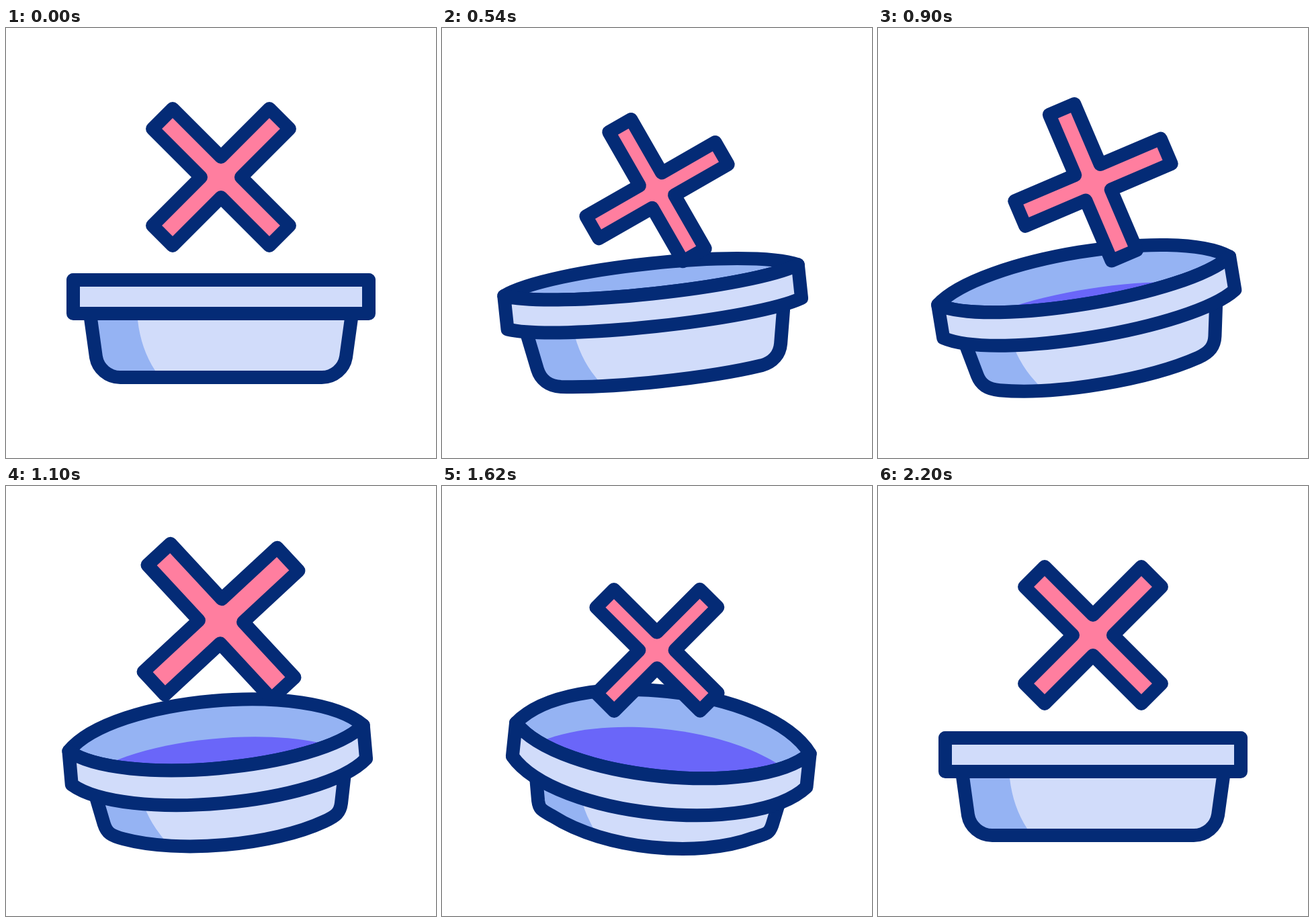
An HTML page with a canvas that plays this animation: 640x640 px, repeating every 2.4 s.

```html
<!DOCTYPE html>
<html lang="en">
<head>
<meta charset="utf-8">
<title>Basin</title>
<style>
html, body { margin: 0; width: 100%; height: 100%; overflow: hidden; background: #fff; }
canvas { display: block; width: 640px; height: 640px; }
</style>
</head>
<body>
<canvas id="stage" width="640" height="640"></canvas>
<script>
const ctx = document.getElementById('stage').getContext('2d');
const LOOP = 2400;
const NAVY = '#042b76', PINK = '#ff7e9f', PALE = '#d1dcfa', BLUE = '#95b3f3', WATER = '#6a66f9';
const RAD = Math.PI / 180;

// Keys are [ms, value] pairs joined by sine ease-in-out.
const TILT = [[200, 0], [800, -10], [1600, 6], [2200, 0]];
const OPEN = [[200, 0], [800, 41], [1400, 70], [1600, 70], [2200, 0]];
const DROP = [[200, 0], [700, 1], [1200, -1], [1700, 1], [2200, 0]];
const TURN = [[200, 0], [800, 25], [1400, -20.5], [1800, 14.5], [2200, 0]];

function at(keys, t) {
  if (t <= keys[0][0]) return keys[0][1];
  for (let i = 1; i < keys.length; i++) {
    const [a, va] = keys[i - 1], [b, vb] = keys[i];
    if (t < b) return va + (vb - va) * (1 - Math.cos(Math.PI * (t - a) / (b - a))) / 2;
  }
  return keys[keys.length - 1][1];
}

function fill(path, color) {
  ctx.fillStyle = color;
  ctx.fill(path);
}

function outline(path) {
  ctx.strokeStyle = NAVY;
  ctx.lineWidth = 20;
  ctx.stroke(path);
}

function inside(path, draw) {
  ctx.save();
  ctx.clip(path);
  draw();
  ctx.restore();
}

// Bow between the rim's two ends; dir is 1 for left to right.
function bow(p, y, sag, dir) {
  const c = y + sag * 4 / 3;
  p.bezierCurveTo(-148 * dir, c, 148 * dir, c, 220 * dir, y);
}

function lens(y, rise, sag) {
  const p = new Path2D();
  p.moveTo(-220, y);
  bow(p, y, -rise, 1);
  bow(p, y, sag, -1);
  p.closePath();
  return p;
}

function bodyPath(o) {
  const p = new Path2D(), q = o * o;
  const top = 195 - 8 * q, side = 186 - 11 * o, low = 60 - 12 * q;
  const base = low + 24 * o + 16 * q;
  p.moveTo(-top, -35);
  p.lineTo(-side, 30 - 3 * o);
  p.bezierCurveTo(-side + 3, 47 - 7 * o, -168, low - 8 * o, -150, low);
  p.bezierCurveTo(-70, base, 70, base, 150, low);
  p.bezierCurveTo(168, low - 8 * o, side - 3, 47 - 7 * o, side, 30 - 3 * o);
  p.lineTo(top, -35);
  p.closePath();
  return p;
}

function shadePath(o) {
  const p = new Path2D(), s = 3 * o;
  p.moveTo(-230, -40);
  p.lineTo(-124 + s, -40);
  p.lineTo(-124 + s, -25);
  p.quadraticCurveTo(-119 + s, 18, -98 + s, 50);
  p.lineTo(-84 + s, 72);
  p.lineTo(-230, 72);
  p.closePath();
  return p;
}

function drawBasin(t) {
  const rise = at(OPEN, t), sag = rise * 0.81, o = rise / 70;
  ctx.save();
  ctx.translate(320, 460);
  ctx.rotate(at(TILT, t) * RAD);

  const body = bodyPath(o);
  fill(body, PALE);
  inside(body, () => fill(shadePath(o), BLUE));
  outline(body);

  const mouth = lens(-85, rise, sag);
  fill(mouth, BLUE);
  inside(mouth, () => fill(lens(-29, rise, sag), WATER));
  outline(mouth);

  const rim = new Path2D();
  rim.moveTo(-220, -85);
  bow(rim, -85, sag, 1);
  rim.lineTo(220, -35);
  bow(rim, -35, sag * (0.85 + 0.25 * o), -1);
  rim.closePath();
  fill(rim, PALE);
  outline(rim);
  ctx.restore();
}

function drawCross(t) {
  const k = at(DROP, t), s = 1 - 0.128 * k;
  const len = 123 * s, w = 21.2 * s;
  const p = new Path2D();
  for (let i = 0; i < 4; i++) {
    const c = Math.cos(i * Math.PI / 2), n = Math.sin(i * Math.PI / 2);
    for (const [x, y] of [[w, -w], [len, -w], [len, w]]) {
      p.lineTo(x * c - y * n, x * n + y * c);
    }
  }
  p.closePath();
  ctx.save();
  ctx.translate(320, 222 + 25.5 * k);
  ctx.rotate((45 + at(TURN, t)) * RAD);
  fill(p, PINK);
  outline(p);
  ctx.restore();
}

function render(t) {
  ctx.fillStyle = '#fff';
  ctx.fillRect(0, 0, 640, 640);
  ctx.lineJoin = ctx.lineCap = 'round';
  drawBasin(t);
  drawCross(t);
}

const start = performance.now();
function tick() {
  render((performance.now() - start) % LOOP);
  requestAnimationFrame(tick);
}
tick();
</script>
</body>
</html>
```
